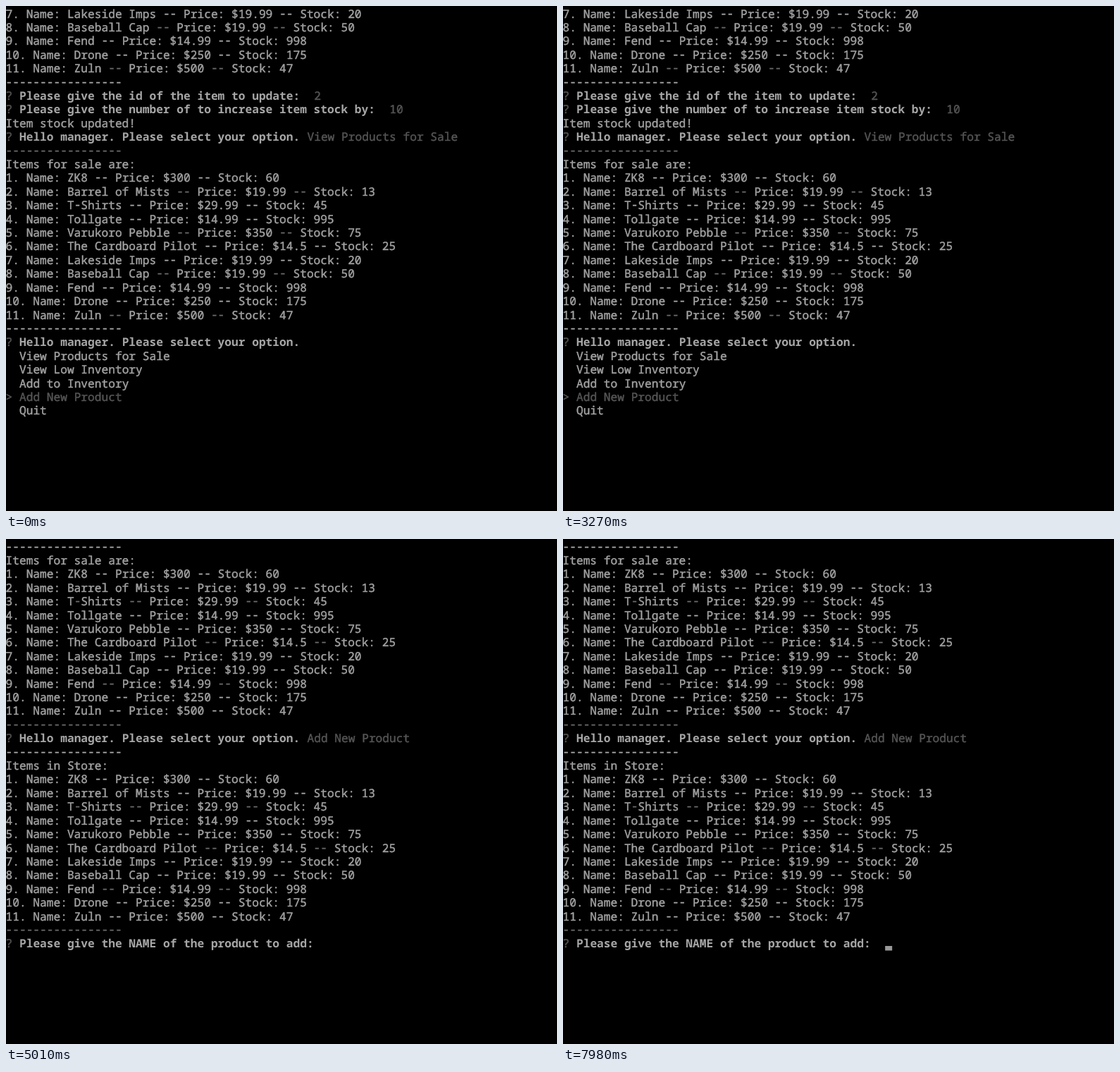
An HTML page for the animation above (8000 ms loop, 782 by 716 pixels).

```html
<!DOCTYPE html>
<html lang="en">
<head>
<meta charset="utf-8">
<title>Store manager terminal</title>
<style>
  html, body { margin: 0; width: 100%; height: 100%; overflow: hidden; background: #000; }
  svg { display: block; width: 782px; height: 716px; }
  text {
    font: 500 16.21px "Noto Sans Mono", "DejaVu Sans Mono", monospace;
    white-space: pre;
    text-rendering: geometricPrecision;
    color: #a2a2a2;
    fill: currentColor;
    stroke: currentColor;
    stroke-width: 0.45px;
  }
  .bold { font-weight: 700; color: #a6a6a6; stroke: none; }
  .dim { color: #555; }
  .dash { baseline-shift: 1px; }
  .faint { color: #666; }
  #cursor { fill: #999; }
</style>
</head>
<body>
<svg id="stage" viewBox="0 0 782 716">
  <rect width="782" height="716"/>
  <g id="menu"></g>
  <g id="store"></g>
  <g id="prompt"></g>
  <rect id="cursor" y="577" width="10" height="6.5"/>
</svg>
<script>
const LOOP = 8000, SWITCH = 3300, ASK = 3330;
const BLINK = 477, BLINK_START = 3156;
const COL = 9.727, ROW = 19.41, LEFT = -0.5, BASE = 16.5;

const $ = id => document.getElementById(id);
const menu = $("menu"), store = $("store"), prompt = $("prompt"), cursor = $("cursor");

function add(parent, tag, attrs, content = "") {
  const el = document.createElementNS("http://www.w3.org/2000/svg", tag);
  for (const key in attrs) el.setAttribute(key, attrs[key]);
  el.textContent = content;
  parent.append(el);
  return el;
}

// Places one run of text; dashes look fainter on every third row.
function run(parent, row, col, content, cls = "") {
  const el = add(parent, "text", { x: LEFT + col * COL, y: BASE + row * ROW, class: cls });
  const dash = row % 3 === 1 ? "dash faint" : "dash";
  for (const part of content.split(/(-+)/)) {
    add(el, "tspan", part[0] === "-" ? { class: dash } : {}, part);
  }
}

function question(parent, row, ask, answer = "", gap = 1) {
  run(parent, row, 0, "?", "dim");
  run(parent, row, 2, ask, "bold");
  if (answer) run(parent, row, 2 + ask.length + gap, answer, "dim");
}

function printLines(parent, row, lines) {
  lines.forEach((line, i) => run(parent, row + i, 0, line));
}

const items = [
  ["ZK8", "300", 60],
  ["Barrel of Mists", "19.99", 13],
  ["T-Shirts", "29.99", 45],
  ["Tollgate", "14.99", 995],
  ["Varukoro Pebble", "350", 75],
  ["The Cardboard Pilot", "14.5", 25],
  ["Lakeside Imps", "19.99", 20],
  ["Baseball Cap", "19.99", 50],
  ["Fend", "14.99", 998],
  ["Drone", "250", 175],
  ["Zuln", "500", 47]
].map(([name, price, stock], i) =>
  `${i + 1}. Name: ${name} -- Price: $${price} -- Stock: ${stock}`);

const rule = "-".repeat(17);
const hello = "Hello manager. Please select your option.";
const listing = title => [rule, title, ...items, rule];

printLines(menu, 0, [...items.slice(6), rule]);
question(menu, 6, "Please give the id of the item to update:", "2", 2);
question(menu, 7, "Please give the number of to increase item stock by:", "10", 2);
run(menu, 8, 0, "Item stock updated!");
question(menu, 9, hello, "View Products for Sale");
printLines(menu, 10, listing("Items for sale are:"));
question(menu, 24, hello);
["View Products for Sale", "View Low Inventory", "Add to Inventory", "Add New Product", "Quit"]
  .forEach((option, i) => {
    const chosen = i === 3;
    if (chosen) run(menu, 25 + i, 0, ">", "dim");
    run(menu, 25 + i, 2, option, chosen ? "dim" : "");
  });

printLines(store, 0, listing("Items for sale are:"));
question(store, 14, hello, "Add New Product");
printLines(store, 15, listing("Items in Store:"));

question(prompt, 29, "Please give the NAME of the product to add:");

const show = (el, on) => el.setAttribute("visibility", on ? "visible" : "hidden");

function draw(t) {
  const listed = t >= SWITCH, asked = t >= ASK;
  show(menu, !listed);
  show(store, listed);
  show(prompt, asked);
  const lit = Math.floor((t - BLINK_START) / BLINK) % 2 === 0;
  show(cursor, listed && lit);
  cursor.setAttribute("x", asked ? 47 * COL : 0);
}

const start = performance.now();
function tick() {
  draw((performance.now() - start) % LOOP);
  requestAnimationFrame(tick);
}
tick();
</script>
</body>
</html>
```
